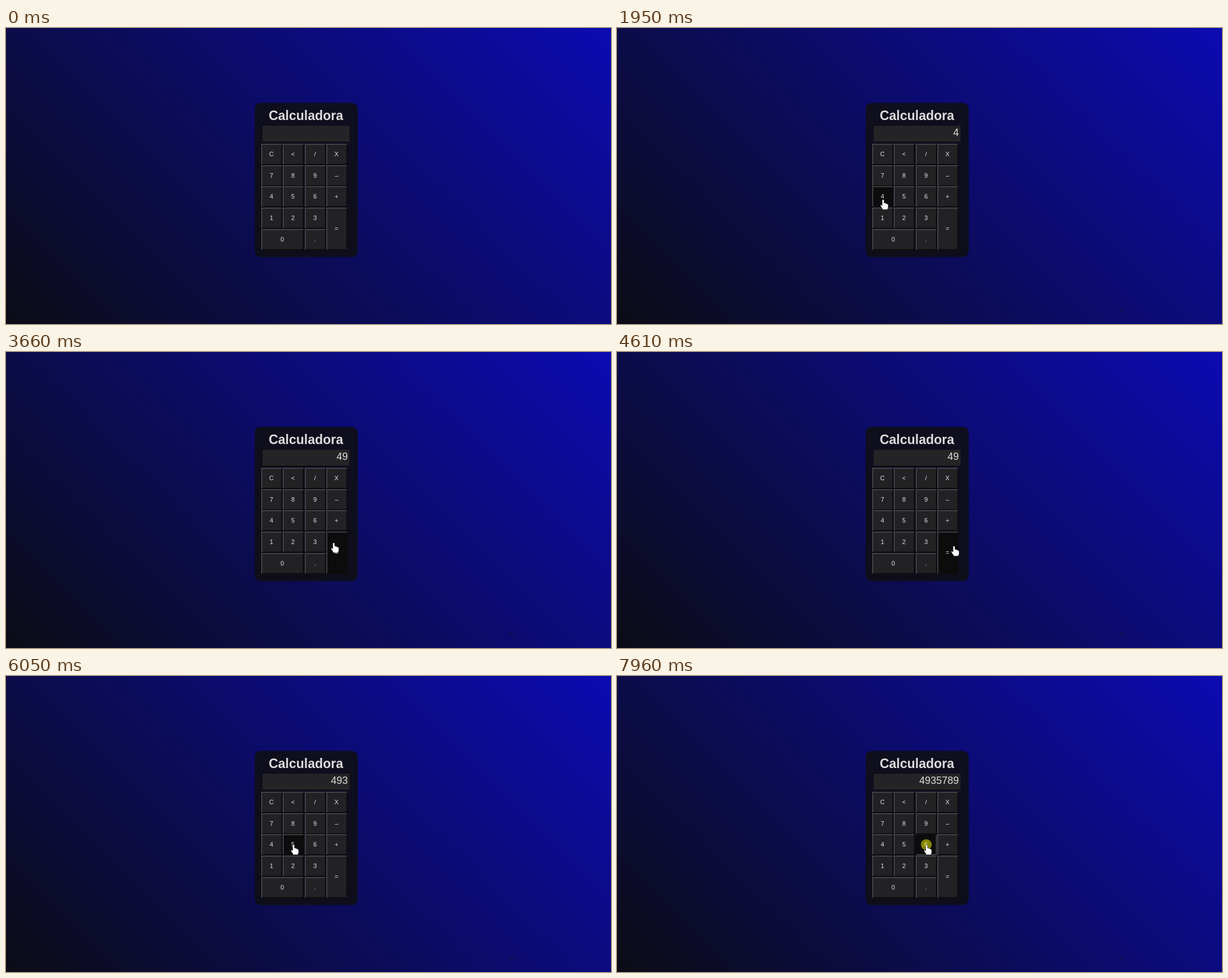
Write an HTML page that moves like this. It is 1069x524 px and loops after 8 s.

```html
<!DOCTYPE html>
<html lang="pt">
<head>
<meta charset="utf-8">
<title>Calculadora</title>
<style>
  html, body { margin: 0; width: 100%; height: 100%; overflow: hidden; }
  body { background: linear-gradient(45deg, #0c0c16, #0b0bb2); }
  svg { display: block; width: 1069px; height: 524px; }
  text { font-family: "Liberation Sans", Arial, sans-serif; }
  .label { font-size: 11px; fill: #e2e2ee; text-anchor: middle; }
  .edge { fill: none; stroke-width: 1.5; }
</style>
</head>
<body>
<svg viewBox="0 0 1069 524" xmlns="http://www.w3.org/2000/svg">
  <ellipse id="smudge" cx="893" cy="499" rx="5" ry="4.5" fill="#0c0c40" opacity=".3"/>
  <rect x="439.5" y="132.5" width="182" height="273" rx="10" fill="#0e0e11" fill-opacity=".86"/>
  <text x="530" y="163" font-size="23" font-weight="700" fill="#dcdcdc" text-anchor="middle">Calculadora</text>
  <rect x="453.5" y="173" width="153.5" height="28" fill="#242426"/>
  <text id="display" x="604" y="191" font-size="18" fill="#dcdcdc" text-anchor="end"></text>
  <g id="keys"></g>
  <g id="cursor" stroke="#111" stroke-width=".6" fill="#fff" stroke-linejoin="round">
    <circle id="ring" r="9.6" fill="#ff0" fill-opacity=".5" stroke="none"/>
    <path id="arrow" d="M0 0V15L3.5 11.8L6 17.5L8.3 16.5L5.8 11H10.5Z"/>
    <path id="hand" transform="translate(.6 0)" d="M-1.7 1.8Q-1.7 .2 0 .2Q1.7 .2 1.7 1.8V6.2Q3.6 5.6 4.4 7Q6 6.5 6.8 8Q9 7.7 9 10V13Q9 15 7.5 18H-.5Q-1.5 15.5-4.2 12Q-5.4 10-4 9.4Q-2.8 9.4-1.7 11Z"/>
  </g>
</svg>
<script>
const LOOP = 8000, ENTER = 780, SETTLE = 70, HOLD = 130;
const SIZE = 37, LIGHT = '#4d4d52', DARK = '#0b0b0e', FACE = '#222224', HOVER = '#0c0c0c';
const columnX = col => Math.round(451 + 38.4 * col);
const rowY = row => Math.floor(205.3 + 37.8 * row);
const $ = id => document.getElementById(id);

function add(tag, attrs, text = '') {
  const node = document.createElementNS('http://www.w3.org/2000/svg', tag);
  for (const name in attrs) node.setAttribute(name, attrs[name]);
  node.textContent = text;
  return $('keys').appendChild(node);
}

function makeKey(label, col, row, cols = 1, rows = 1) {
  const x = columnX(col), y = rowY(row);
  const right = columnX(col + cols - 1) + SIZE, bottom = rowY(row + rows - 1) + SIZE;
  const cx = (x + right) / 2, cy = (y + bottom) / 2;
  const l = x + .75, t = y + .75, r = right - .75, b = bottom - .75;
  const face = add('rect', { x, y, width: right - x, height: bottom - y });
  const far = add('path', { class: 'edge', d: `M${l} ${b}H${r}V${t}` });
  const near = add('path', { class: 'edge', d: `M${l} ${b}V${t}H${r}` });
  add('text', { class: 'label', x: cx - .5, y: cy + 3.7 }, label);
  return {
    label, cx, cy,
    contains: p => p.x >= x && p.x <= right && p.y >= y && p.y <= bottom,
    paint(hover, down) {
      face.setAttribute('fill', hover ? HOVER : FACE);
      near.setAttribute('stroke', down ? DARK : LIGHT);
      far.setAttribute('stroke', down ? LIGHT : DARK);
    }
  };
}

const keys = ['C</X', '789–', '456+', '123'].flatMap((line, row) =>
  [...line].map((label, col) => makeKey(label, col, row)));
keys.push(makeKey('0', 0, 4, 2), makeKey('.', 2, 4), makeKey('=', 3, 3, 1, 2));

// A visit reaches a key, off-centre by dx, dy, and clicks it after a short wait
function visit(at, label, { dx = 0, dy = 0, wait = SETTLE, pass = false } = {}) {
  const key = keys.find(k => k.label === label);
  const click = pass ? Infinity : at + wait;
  return { at, label, click, leave: pass ? at : click + HOLD, x: key.cx + dx, y: key.cy + dy };
}

const visits = [
  { leave: ENTER + SETTLE, click: Infinity, x: 887, y: 490 },
  visit(1190, '5', { dx: 19, dy: 4, pass: true }),
  visit(1540, '1', { dy: -8, pass: true }),
  visit(1610, '4', { dy: 5, wait: 200 }),
  visit(2560, '=', { dx: -6, dy: -23, wait: 130 }),
  visit(2890, '9'),
  visit(3660, '=', { dx: -6, dy: -18, pass: true }),
  visit(3940, '=', { dx: 12, dy: -12, wait: 460 }),
  visit(5170, '3', { dx: 13.5, wait: 130 }),
  visit(6050, '5'),
  visit(6660, '7', { dx: 15.5, dy: 7.5 }),
  visit(6940, '8', { dx: -3, dy: 6 }),
  visit(7470, '9', { dy: 8 }),
  visit(7890, '6')
];

const ease = k => k * k * (3 - 2 * k);

function tipAt(time) {
  const next = visits.findIndex(v => v.leave > time);
  const to = visits[next], from = visits[Math.max(0, next - 1)];
  if (next === 0 || time >= to.at) return to;
  const k = ease((time - from.leave) / (to.at - from.leave));
  return { x: from.x + (to.x - from.x) * k, y: from.y + (to.y - from.y) * k };
}

const show = (id, on) => $(id).setAttribute('visibility', on ? 'visible' : 'hidden');

function render(time) {
  const active = time >= ENTER;
  const tip = tipAt(time);
  const down = visits.some(v => time >= v.click && time < v.leave);
  const overKeys = tip.x < 606 && tip.y < 396;

  for (const key of keys) {
    const hover = key.contains(tip);
    key.paint(hover, hover && down);
  }
  $('display').textContent = visits
    .filter(v => v.click + HOLD <= time && v.label !== '=')
    .map(v => v.label).join('');
  $('cursor').setAttribute('transform', `translate(${tip.x} ${tip.y})`);
  show('ring', down);
  show('hand', active && overKeys);
  show('arrow', active && !overKeys);
  show('smudge', time >= ENTER + SETTLE);
}

const begin = performance.now();
function tick() {
  render((performance.now() - begin) % LOOP);
  requestAnimationFrame(tick);
}
tick();
</script>
</body>
</html>
```
